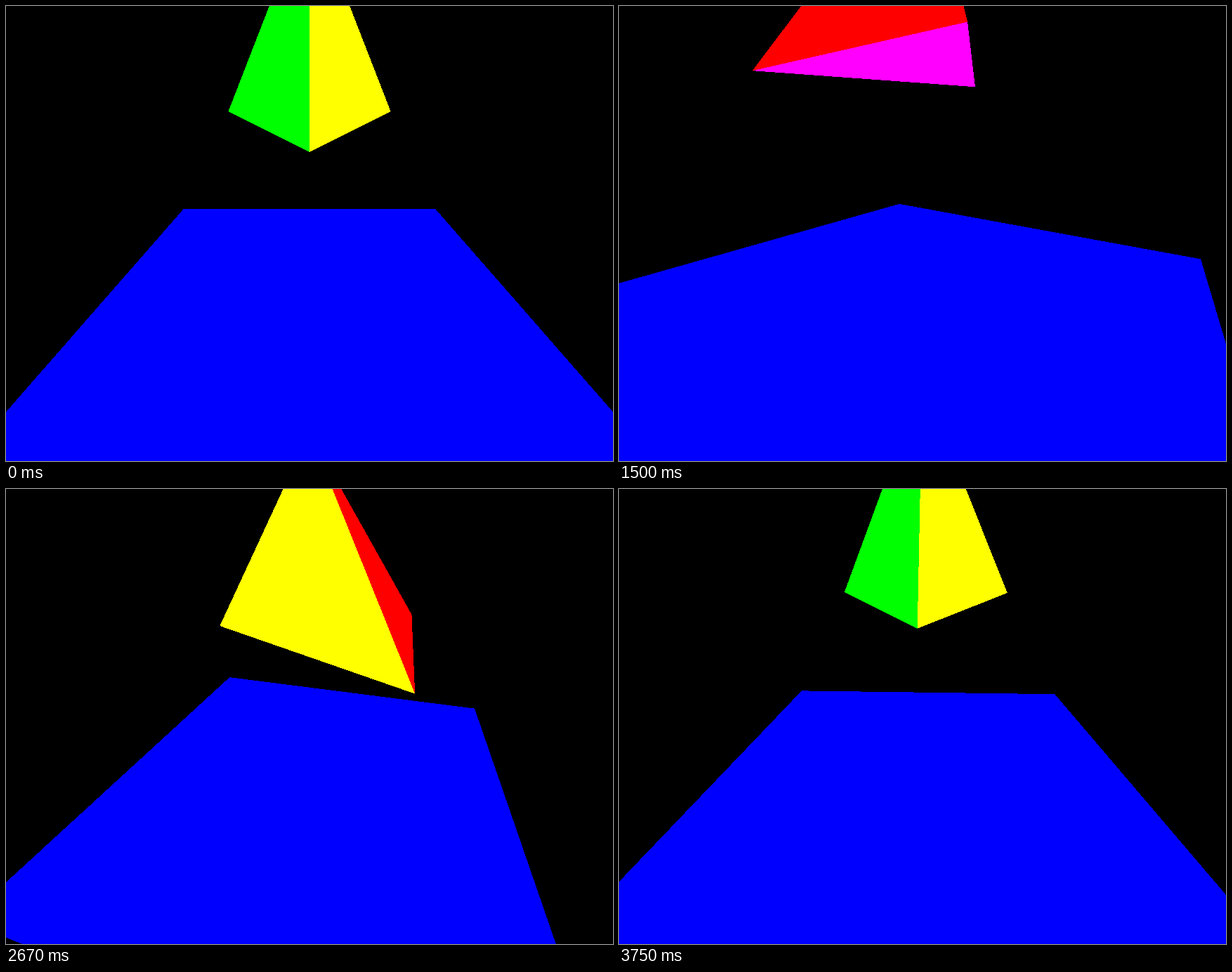
An HTML page that plays this animation: 864 px wide and 648 px high, repeating every 3780 ms.

```html
<!DOCTYPE html>
<html lang="en">
<head>
<meta charset="utf-8">
<title>Orbiting a pyramid</title>
<style>
html, body { margin: 0; width: 100%; height: 100%; overflow: hidden; background: #000; }
svg { display: block; width: 864px; height: 648px; background: #000; }
</style>
</head>
<body>
<svg id="stage" viewBox="0 0 864 648" shape-rendering="crispEdges"></svg>
<script>
const STEP_MS = 30, STEPS = 126, TURN = 0.05;
const CX = 432, CY = 324, FOCAL = 432, NEAR = 0.05;
const RADIUS = 3, LOOK = 4.5;   // orbit radius, distance to the look-at point

// Points are [x, height, z]; z points away from the camera at time zero.
const front = [0, 2, -1], left = [-1, 2, 1], right = [1, 2, 1], apex = [0, 3.5, 0];
const S = 2.5;
const faces = [
  { color: '#00f', pts: [[-S, 0, S], [-S, 0, -S], [S, 0, -S], [S, 0, S]] },
  { color: '#0f0', pts: [left, front, apex] },
  { color: '#ff0', pts: [front, right, apex] },
  { color: '#f00', pts: [right, left, apex] },
  { color: '#f0f', pts: [right, front, left] }
];

const stage = document.getElementById('stage');
for (const face of faces) {
  face.el = document.createElementNS('http://www.w3.org/2000/svg', 'polygon');
  face.el.setAttribute('fill', face.color);
  stage.append(face.el);
}

function makeView(angle) {
  const c = Math.cos(angle), s = Math.sin(angle);
  const height = 2.5 + Math.sin(2 * angle);
  const pitch = Math.atan2(height, LOOK);
  const cp = Math.cos(pitch), sp = Math.sin(pitch);
  return ([x, y, z]) => {
    const ahead = RADIUS + z * c + x * s, down = height - y;
    return [x * c - z * s, down * cp - ahead * sp, ahead * cp + down * sp];
  };
}

function clipNear(pts) {
  const out = [];
  pts.forEach((p, i) => {
    const q = pts[(i + 1) % pts.length];
    if (p[2] >= NEAR) out.push(p);
    if ((p[2] >= NEAR) !== (q[2] >= NEAR)) {
      const k = (NEAR - p[2]) / (q[2] - p[2]);
      out.push(p.map((v, j) => v + (q[j] - v) * k));
    }
  });
  return out;
}

const project = ([x, y, d]) => [CX + FOCAL * x / d, CY + FOCAL * y / d];

function area(pts) {
  return pts.reduce((sum, [x, y], i) => {
    const [u, v] = pts[(i + 1) % pts.length];
    return sum + x * v - u * y;
  }, 0);
}

function draw(ms) {
  const step = Math.floor(ms / STEP_MS) % STEPS;
  const view = makeView(step * TURN);
  for (const { el, pts } of faces) {
    const flat = clipNear(pts.map(view)).map(project);
    const shown = area(flat) < 0;
    el.setAttribute('points', shown ? flat.map(p => p.map(v => v.toFixed(2))).join(' ') : '');
  }
}

const start = performance.now();
function tick() {
  draw(performance.now() - start);
  requestAnimationFrame(tick);
}
draw(0);
requestAnimationFrame(tick);
</script>
</body>
</html>
```
